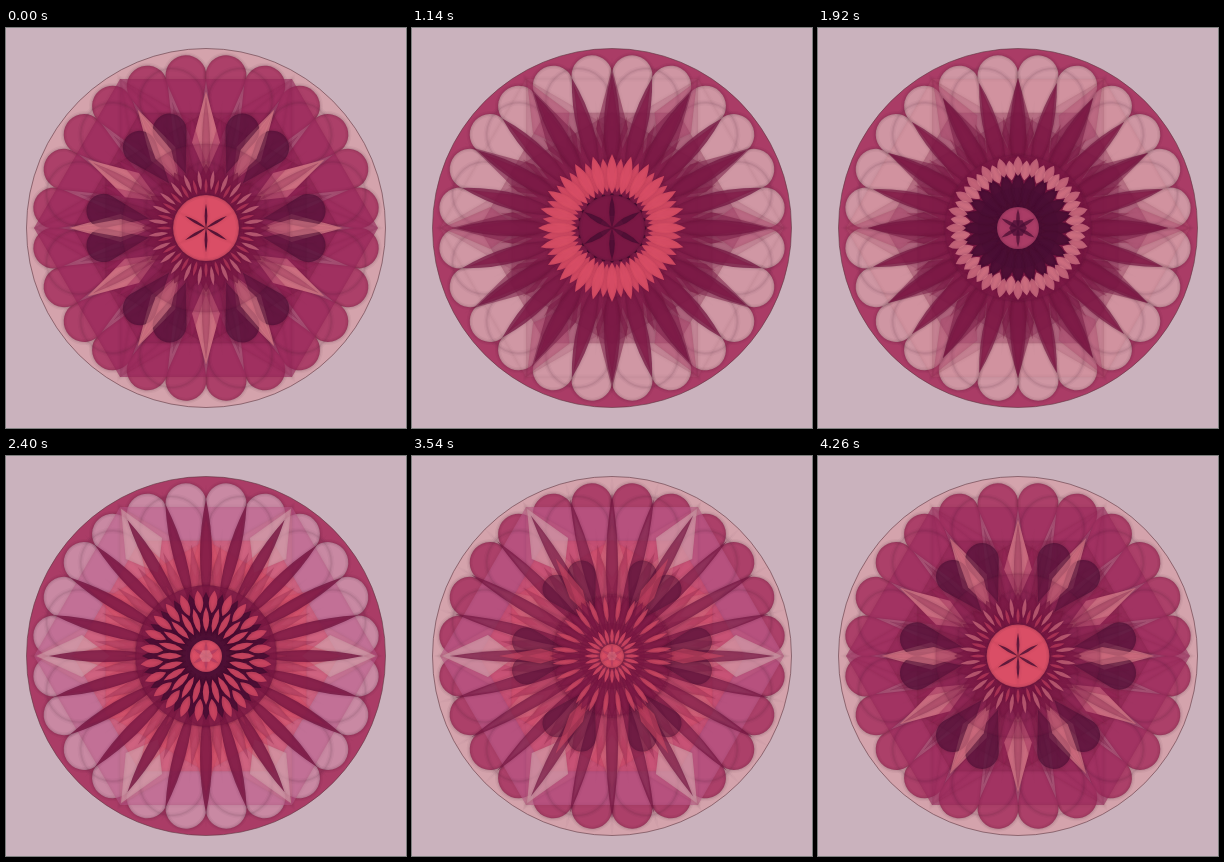
An HTML page with a canvas that plays this animation: 400x400 px, repeating every 4.32 s.

```html
<!DOCTYPE html>
<html lang="en">
<head>
<meta charset="utf-8">
<title>Mandala</title>
<style>
html, body { margin: 0; width: 100%; height: 100%; overflow: hidden; background: #cab2bd; }
canvas { display: block; width: 400px; height: 400px; }
</style>
</head>
<body>
<canvas id="stage" width="400" height="400"></canvas>
<script>
const ctx = document.getElementById('stage').getContext('2d');
const LOOP = 4320, STEP = 60, TAU = Math.PI * 2, DEG = TAU / 360;
const TIMES = [0, 1140, 1920, 2400, 3060, 3540, LOOP];

const INK = {
  p: [212, 163, 172], k: [205, 148, 172], o: [190, 92, 140],
  c: [170, 60, 102], m: [152, 38, 90], w: [122, 24, 68],
  d: [74, 14, 52], r: [218, 78, 102], s: [219, 124, 138]
};

let seg = 0, mix = 0;
const lerp = (a, b) => a + (b - a) * mix;

// Values and ink letters both hold one entry per key time; the last wraps to the first.
const at = v => Array.isArray(v) ? lerp(v[seg], v[(seg + 1) % 6]) : v;
function ink(letters, alpha = 1) {
  const a = INK[letters[seg]], b = INK[letters[(seg + 1) % 6]];
  return `rgba(${a.map((n, i) => Math.round(lerp(n, b[i]))).join()},${at(alpha)})`;
}

function softEdge(strength) {
  for (const [width, alpha] of [[6, .06], [3, .1], [.8, .14]]) {
    ctx.lineWidth = width;
    ctx.strokeStyle = `rgba(55,20,40,${alpha * strength})`;
    ctx.stroke();
  }
}

function paint(fill, edge) {
  if (fill) {
    ctx.fillStyle = fill;
    ctx.fill();
  }
  if (edge) softEdge(edge);
}

function disc(r, fill, edge) {
  ctx.beginPath();
  ctx.arc(0, 0, r, 0, TAU);
  paint(fill, edge);
}

function poly(sides, r, turn, fill, edge) {
  ctx.beginPath();
  for (let i = 0; i < sides; i++) {
    const a = turn * DEG + i * TAU / sides;
    ctx.lineTo(r * Math.cos(a), r * Math.sin(a));
  }
  ctx.closePath();
  paint(fill, edge);
}

const SHAPES = {
  // A round head of radius w with straight sides running to a point.
  drop(a, b, w) {
    const head = b - w, half = Math.acos(w / (head - a));
    ctx.moveTo(a, 0);
    ctx.arc(head, 0, w, half - Math.PI, Math.PI - half);
    ctx.closePath();
  },
  leaf(a, b, w) {
    const mid = a + (b - a) * .48;
    ctx.moveTo(a, 0);
    ctx.quadraticCurveTo(mid, w * 2, b, 0);
    ctx.quadraticCurveTo(mid, -w * 2, a, 0);
  },
  kite(a, b, w) {
    const mid = a + (b - a) * .38;
    ctx.moveTo(a, 0);
    ctx.lineTo(mid, w);
    ctx.lineTo(b, 0);
    ctx.lineTo(mid, -w);
    ctx.closePath();
  }
};

function ring(shape, angles, r0, r1, w, fill, edge) {
  for (const angle of angles) {
    ctx.save();
    ctx.rotate(angle * DEG);
    ctx.beginPath();
    SHAPES[shape](r0, r1, w);
    paint(fill, edge);
    ctx.restore();
  }
}

const spread = (n, turn = 0) => Array.from({ length: n }, (_, i) => turn + i * 360 / n);
const EVERY_15 = spread(24), BETWEEN = spread(24, 7.5);
const EVERY_30 = spread(12), MIDWAY = spread(12, 15);
const EVERY_60 = spread(6), UPRIGHT = spread(6, 30);
const PAIRS = [...spread(6, -9.5), ...spread(6, 9.5)];

function rim() {
  disc(179.5, ink('pccccp'), 0);
  ctx.lineWidth = 1;
  ctx.strokeStyle = 'rgba(95,55,65,.6)';
  ctx.stroke();
  ring('drop', BETWEEN, 80, 174, 20.5, ink('cppkkc', [.95, .88, .88, .88, .88, .95]), .7);
}

function lattice() {
  poly(6, 172, 0, ink('mpsooo', [.6, .08, .14, .55, .6, .62]), .2);
  for (const turn of [0, 180])
    poly(3, 172, turn, ink('mwwsss', [.25, .14, .14, .16, .12, .12]), .2);
  const veil = [.32, .3, .28, .45, .42, .42];
  poly(6, 133, 0, ink('wwwrrr', veil), .2);
  poly(6, 116, 30, ink('wwwrrr', veil), .2);
  ring('drop', MIDWAY, 40, 164, 32, null, .55);
}

function spikes() {
  ring('kite', EVERY_60, at([80, 92, 86, 96, 98, 96]), 170, 21,
    ink('mccppp', [0, .4, .35, .65, .65, .65]), .2);
  ring('kite', EVERY_30, at([54, 62, 60, 76, 80, 78]), at([137, 160, 150, 136, 132, 132]),
    at([14, 16, 16, 12, 12, 12]), ink('swwrss', [.85, .5, .5, .45, .3, .35]), .2);
  ring('kite', BETWEEN, 40, 112, 8, ink('mwwwrw', [.4, .4, .4, .3, .3, .3]), .15);
  ring('leaf', EVERY_15, at([36, 50, 45, 48, 50, 20]), at([130, 155, 150, 157, 166, 162]),
    at([4, 8, 8, 6, 6.5, 6]), ink('wwwwmw', [.3, .75, .7, .82, .9, .72]), .4);
}

function bloom(t) {
  const u = ((t - 1140 + LOOP) % LOOP) / LOOP;
  const reach = 40 + 110 * u;
  const alpha = .62 * Math.min(1, u * u * 2.6, (1 - u) * 4.5);
  ring('drop', PAIRS, reach * .48, reach, reach * .14, `rgba(74,14,52,${alpha})`, alpha);
  ring('kite', EVERY_60, reach * .45, reach * 1.12, reach * .075,
    ink('srrrrr', alpha), .2);
}

function core() {
  const r = at([62, 34, 54, 52, 50, 44]);
  const dark = [.65, 1, .92, .9, .9, .6];
  disc(r * 1.36, ink('wwwwww', [.25, .6, .65, .7, 0, .2]), .3);
  ring('drop', UPRIGHT, 10, at([66, 70, 72, 71, 70, 62]), 22,
    ink('wwwwdw', [0, .1, .2, .35, .15, .15]), .3);
  disc(r * .75, ink('wddddw', dark), .3);
  ring('leaf', EVERY_15, r * .4, at([64, 36, 56, 64, 73, 62]), r * .12,
    ink('wddddw', dark), .3);
  ring('leaf', BETWEEN, at([38, 36, 48, 43, 16, 34]), at([58, 70, 68, 66, 27, 60]),
    at([2, 4.6, 5, 4.2, 1, 2.4]), ink('srsrsr', [.65, .9, .85, .8, .6, .7]), .25);
  ring('leaf', EVERY_15, at([34, 34, 52, 24, 10, 12]), at([50, 74, 72, 49, 26, 28]),
    at([1.6, 5.4, 4.6, 3.2, 1.1, 1.8]), ink('rrsrsr', [.5, .95, .75, .85, .7, .85]), .25);
}

function heart() {
  const r = at([33, 33, 21, 16, 8, 12]);
  disc(r, ink('rwcrsr'), .8);
  ring('leaf', UPRIGHT, 0, at([24, 32, 19, 14, 7, 11]), at([1.4, 2.8, 1.8, 1.5, .8, 1.2]),
    ink('dddccc', [.9, .85, .75, .6, .5, .5]), .3);
  poly(6, r * .42, 0, ink('rwdsrs', [0, .2, .75, .65, .4, .45]), 0);
}

function draw(now) {
  const t = Math.floor(now / STEP) * STEP % LOOP;
  seg = TIMES.findIndex((start, i) => t >= start && t < TIMES[i + 1]);
  mix = (t - TIMES[seg]) / (TIMES[seg + 1] - TIMES[seg]);
  ctx.setTransform(1, 0, 0, 1, 0, 0);
  ctx.fillStyle = '#cab2bd';
  ctx.fillRect(0, 0, 400, 400);
  ctx.translate(200, 200);
  rim();
  lattice();
  spikes();
  bloom(t);
  core();
  heart();
}

const begin = performance.now();
function tick() {
  draw(performance.now() - begin);
  requestAnimationFrame(tick);
}
tick();
</script>
</body>
</html>
```
